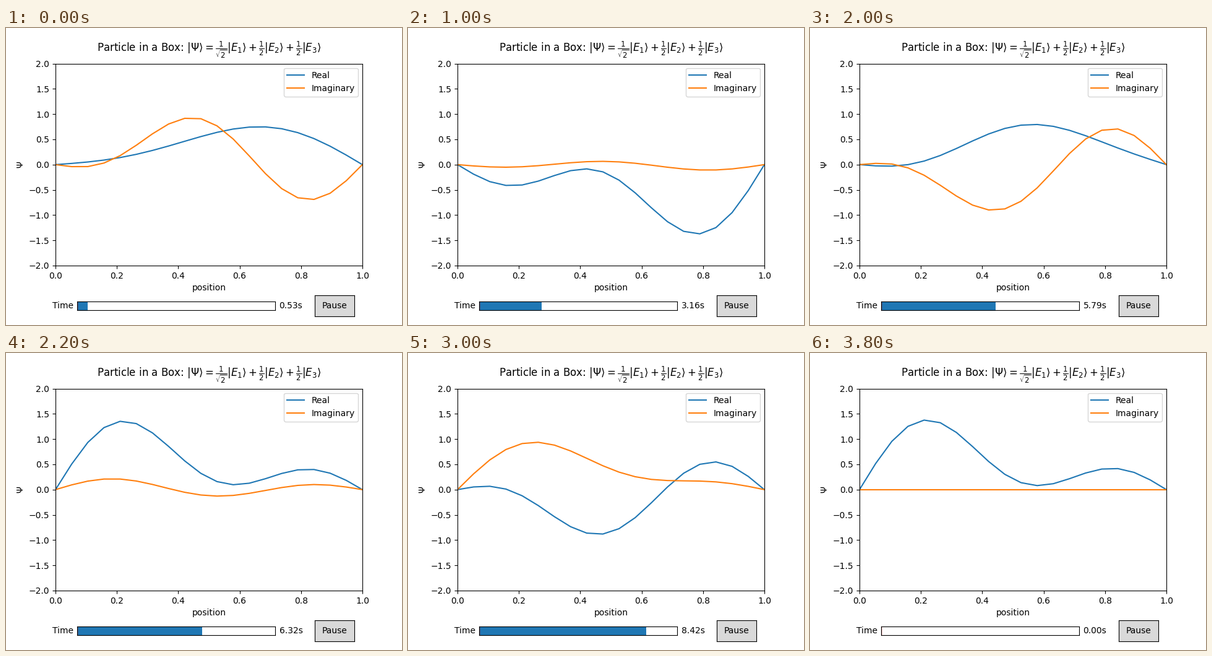
Recreate the animation shown at these times as a matplotlib script. Size 640 by 480 pixels, loop 4000 ms.

```python
import numpy as np
import matplotlib.pyplot as plt
from matplotlib.animation import FuncAnimation

FRAMES = 20
T_MAX = 10.0

plt.rcParams["font.family"] = "DejaVu Sans"

# Superposition of the first three energy levels, E_n = n^2
x = np.linspace(0, 1, 20)
times = np.linspace(0, T_MAX, FRAMES)
levels = [(1, 1 / np.sqrt(2)), (2, 0.5), (3, 0.5)]


def psi(t):
    return sum(c * np.sin(n * np.pi * x) * np.exp(1j * n**2 * t)
               for n, c in levels)


def widget_axes(rect, color):
    ax = fig.add_axes(rect, facecolor=color)
    ax.set(xticks=[], yticks=[])
    return ax


fig, ax = plt.subplots(figsize=(6.4, 4.8), dpi=100)
fig.subplots_adjust(left=0.125, right=0.9, bottom=0.2, top=0.88)
real, = ax.plot(x, psi(0).real, label="Real")
imag, = ax.plot(x, psi(0).imag, label="Imaginary")
ax.set(xlim=(0, 1), ylim=(-2, 2), xlabel="position", ylabel=r"$\Psi$")
ax.legend(loc="upper right")
fig.text(0.5125, 442 / 480,
         r"Particle in a Box: $|\Psi\rangle = \frac{1}{\sqrt{2}}|E_1\rangle"
         r" + \frac{1}{2}|E_2\rangle + \frac{1}{2}|E_3\rangle$",
         size=12, ha="center", va="baseline")

# Time slider
slider = widget_axes([0.18, 0.05, 0.5, 0.03], "white")
bar = plt.Rectangle((0, 0), 0, 1, facecolor="C0", linewidth=0)
slider.add_patch(bar)
slider.axvline(0, color="r", lw=1)
slider.set(xlim=(0, T_MAX), ylim=(0, 1))
slider.text(-0.02, 0.5, "Time", transform=slider.transAxes,
            ha="right", va="center")
value = slider.text(1.02, 0.5, "", transform=slider.transAxes,
                    ha="left", va="center")

# Pause button
button = widget_axes([0.78, 0.03, 0.1, 0.07], "0.85")
button.text(0.5, 0.5, "Pause", transform=button.transAxes,
            ha="center", va="center")


def update(i):
    t = times[(i + 1) % FRAMES]
    wave = psi(t)
    real.set_ydata(wave.real)
    imag.set_ydata(wave.imag)
    bar.set_width(t)
    value.set_text(f"{t:.2f}s")
    return real, imag, bar, value


anim = FuncAnimation(fig, update, frames=FRAMES, interval=200,
                     repeat=True, repeat_delay=0)
plt.show()
```
